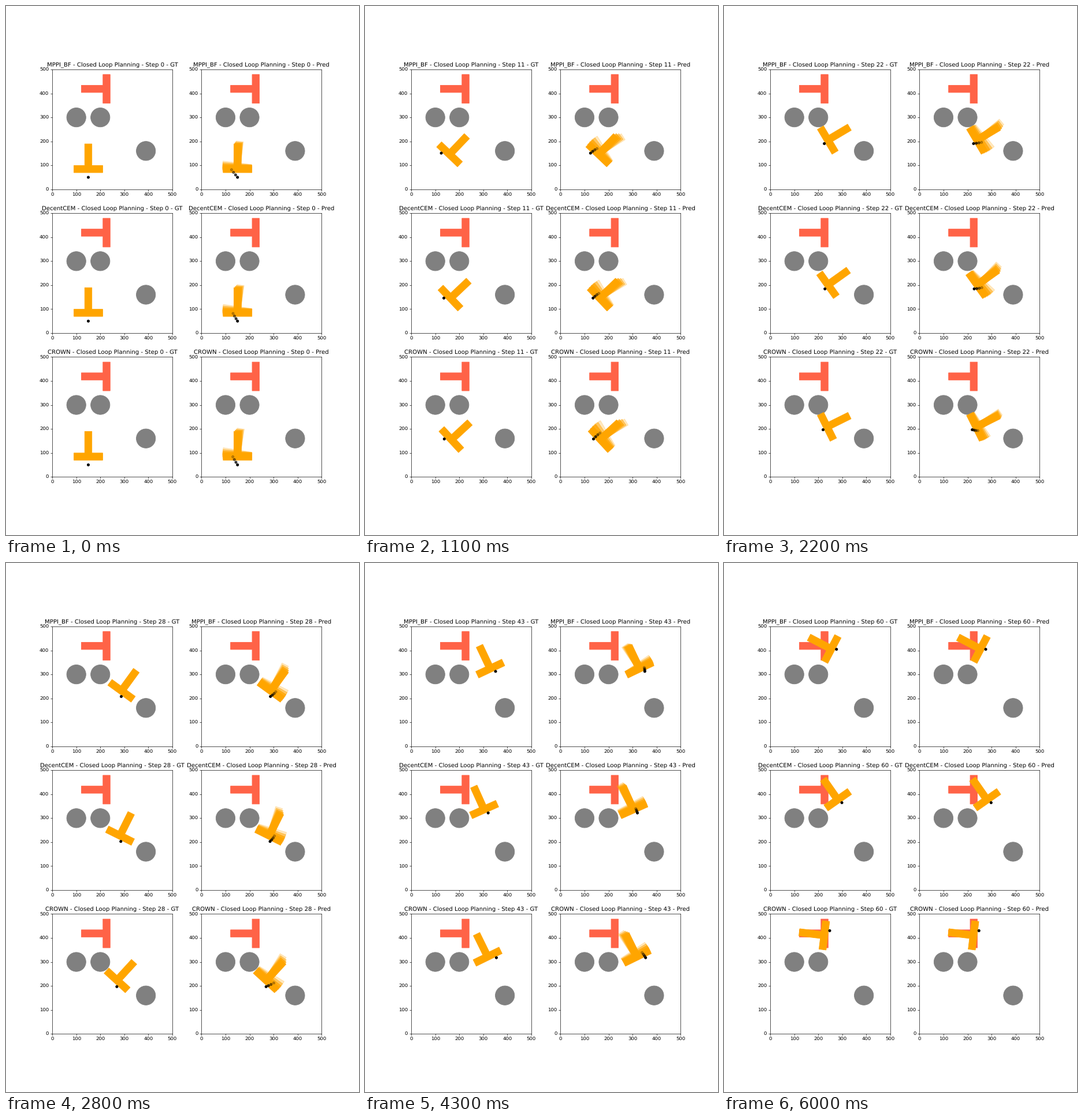
Animation of 611 by 917 pixels, one loop 6100 ms. Source, as a matplotlib script:

```python
import numpy as np
import matplotlib.pyplot as plt
from matplotlib.animation import FuncAnimation
from matplotlib.patches import Circle, Polygon

W, H, DPI = 611, 917, 61.1
LAST = 60
HORIZON = 3
DRAG = 0.8          # the T lags behind the pusher within a plan
REACH = 20          # pusher distance from the middle of the bar in contact
START_GAP = 34.5
APPROACH = 3        # steps until first contact
KEY_STEPS = np.array([0, 7, 16, 28, 37, 49, LAST])

# T outline, origin at the middle of the bar, stem pointing up
TEE = [(-60, -15), (60, -15), (60, 15), (15, 15),
       (15, 105), (-15, 105), (-15, 15), (-60, 15)]
START = (150, 84.4, 0, 0)
GOAL = (226, 419, 90)
OBSTACLES = [(100, 300), (200, 300), (390, 160)]

# Key poses: bar x, bar y, angle, contact point along the bar
PATHS = {
    "MPPI_BF": [START, (145, 119, -21.5, -36), (189, 180, -67, -7),
                (288.5, 231.5, -36, 13), (324, 295, 1, 16),
                (318, 350, 45.5, 13), (254, 406, 62.5, 9)],
    "DecentCEM": [START, (147, 120, -25, -24), (194.5, 178, -67.5, -5),
                  (282, 227, -26.5, 14), (309.5, 296.5, 9, 11),
                  (290, 365, 33, 9), (281, 377, 35, 7)],
    "CROWN": [START, (147, 124, -26.5, -25), (201.5, 193, -68, -9),
              (270, 223, -42.5, 17), (322, 284.5, 3.7, 35),
              (294, 356.5, 45.5, 23), (225, 411, 83, 22)],
}


def place(points, x, y, angle):
    a = np.radians(angle)
    c, s = np.cos(a), np.sin(a)
    return np.asarray(points) @ np.array([(c, s), (-s, c)]) + (x, y)


def smooth(keys, step):
    """Cubic Hermite curve through the key rows."""
    slopes = np.gradient(keys, KEY_STEPS, axis=0)
    i = min(np.searchsorted(KEY_STEPS, step, side="right"), len(KEY_STEPS) - 1) - 1
    span = KEY_STEPS[i + 1] - KEY_STEPS[i]
    t = (step - KEY_STEPS[i]) / span
    return ((1 + 2 * t) * (1 - t) ** 2 * keys[i] + t * (1 - t) ** 2 * span * slopes[i]
            + t * t * (3 - 2 * t) * keys[i + 1] + t * t * (t - 1) * span * slopes[i + 1])


class Panel:
    def __init__(self, ax, method, kind, horizon):
        self.ax, self.method, self.kind = ax, method, kind
        self.keys = np.array(PATHS[method], float)
        ax.set(xlim=(0, 500), ylim=(0, 500), aspect="equal")
        self.add_tee(color="tomato").set_xy(place(TEE, *GOAL))
        for center in OBSTACLES:
            ax.add_patch(Circle(center, 40, color="gray"))
        alphas = np.linspace(1, 0.25, HORIZON + 1)[:horizon + 1]
        self.tees = [self.add_tee(color="orange", alpha=a, zorder=2) for a in alphas]
        self.dots = [ax.add_patch(Circle((0, 0), 5, color="black", alpha=a, zorder=3))
                     for a in alphas]

    def add_tee(self, **style):
        return self.ax.add_patch(Polygon(TEE, snap=False, **style))

    def pose(self, step):
        return smooth(self.keys, min(step, LAST))

    def pusher(self, step):
        *pose, slide = self.pose(step)
        gap = np.interp(step, [0, APPROACH], [START_GAP, REACH])
        return place((slide, -gap), *pose)

    def update(self, step):
        for i, (tee, dot) in enumerate(zip(self.tees, self.dots)):
            tee.set_xy(place(TEE, *self.pose(step + DRAG * i)[:3]))
            dot.center = self.pusher(step + i)
            tee.set_visible(step + i <= LAST)
            dot.set_visible(step + i <= LAST)
        self.ax.set_title(
            f"{self.method} - Closed Loop Planning - Step {step} - {self.kind}")


plt.rcParams.update({"font.family": "DejaVu Sans", "text.hinting": "no_hinting"})
fig, axes = plt.subplots(3, 2, figsize=((W + 1e-6) / DPI, (H + 1e-6) / DPI), dpi=DPI)
panels = [Panel(ax, method, kind, horizon)
          for row, method in zip(axes, PATHS)
          for ax, kind, horizon in zip(row, ("GT", "Pred"), (0, HORIZON))]


def draw(step):
    for panel in panels:
        panel.update(step)
    return []


anim = FuncAnimation(fig, draw, frames=LAST + 1, interval=100, repeat=True,
                     repeat_delay=0, blit=False)
plt.show()
```
